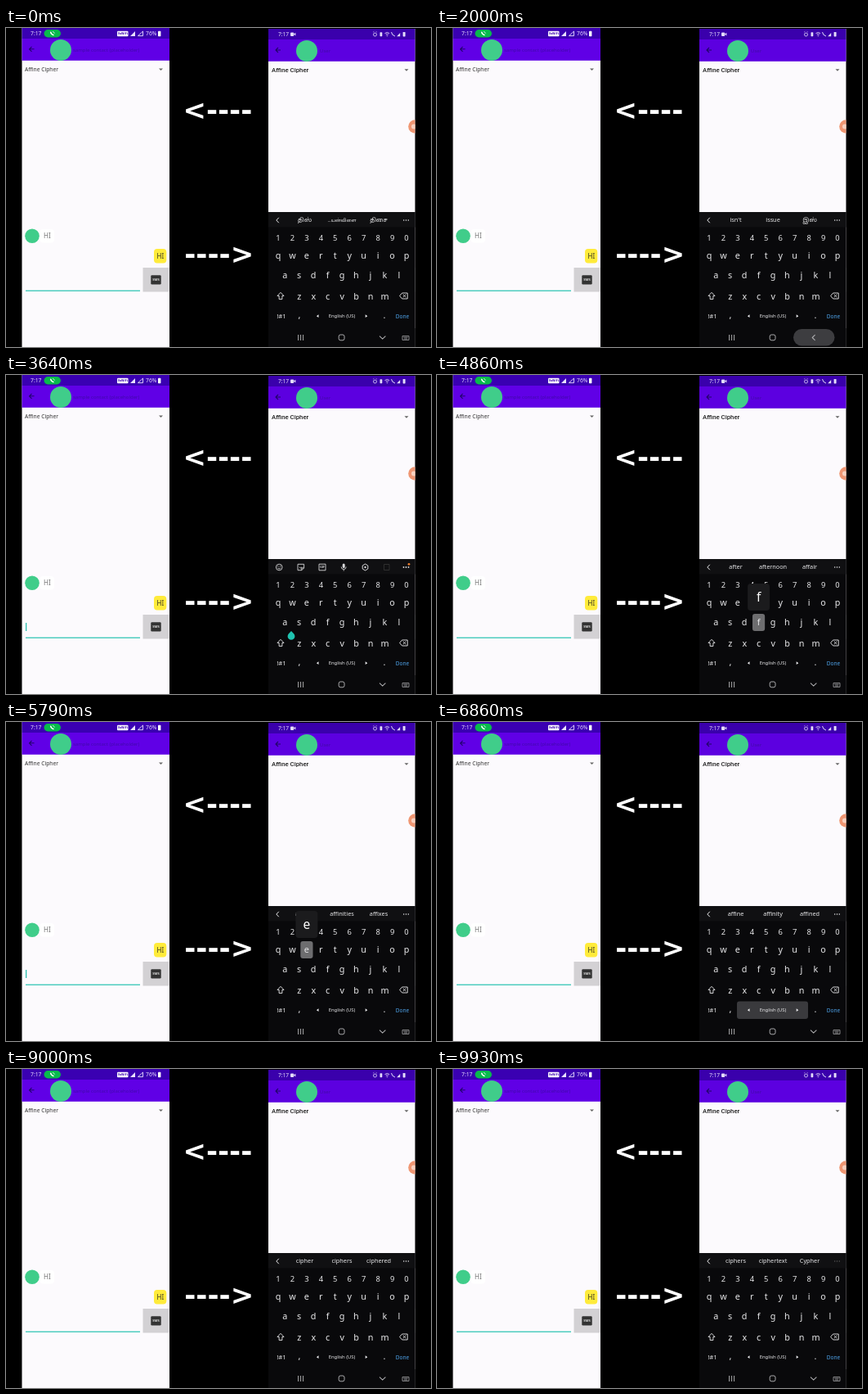
Animation, 520 px wide and 390 px high, one loop 10 s. Source, as an HTML page:

```html
<!DOCTYPE html>
<html lang="en">
<head>
<meta charset="utf-8">
<title>Two phone chat</title>
<style>
html, body { margin: 0; width: 100%; height: 100%; overflow: hidden; background: #000; }
svg { display: block; width: 520px; height: 390px; font-family: "Noto Sans", "Noto Sans Tamil", sans-serif; }
text { white-space: pre; }
</style>
</head>
<body>
<svg viewBox="0 0 520 390">
  <defs><clipPath id="screen"><rect x="321" y="1" width="179.5" height="389"/></clipPath></defs>
  <g id="base"></g>
  <g clip-path="url(#screen)">
    <g id="chat"></g>
    <g id="keys"></g>
    <g id="nav"></g>
  </g>
  <rect id="caret" x="24" y="303" width="1.3" height="10" fill="#2cbfae"/>
</svg>
<script>
const LOOP = 10000, STEP = 500 / 7;
const el = id => document.getElementById(id);

// Shape helpers; label() takes the vertical middle of its capitals
const box = (x, y, w, h, fill, r = 0) =>
  `<rect x="${x}" y="${y}" width="${w}" height="${h}" rx="${r}" fill="${fill}"/>`;
const disc = (x, y, r, fill) => `<circle cx="${x}" cy="${y}" r="${r}" fill="${fill}"/>`;
const fillPath = (d, fill) => `<path d="${d}" fill="${fill}"/>`;
const line = (d, color, w = 1) =>
  `<path d="${d}" fill="none" stroke="${color}" stroke-width="${w}" stroke-linejoin="round"/>`;
const label = (x, y, s, size, fill, anchor = 'start', weight = 400, font = '') =>
  `<text x="${x}" y="${y + size * .36}" font-size="${size}" fill="${fill}" text-anchor="${anchor}" ` +
  `font-weight="${weight}"${font ? ` font-family="${font}"` : ''}>${s}</text>`;
const mid = (x, y, s, size, fill, weight) => label(x, y, s, size, fill, 'middle', weight);

const GREEN = '#40cd8a', YELLOW = '#ffeb3b', PAPER = '#fcfafd', TEAL = '#36c7b6';
const SANS = 'Roboto, sans-serif';

const backArrow = (x, y) => line(`M${x + 7} ${y}H${x + 1}M${x + 4} ${y - 3}L${x + 1} ${y}l3 3`, '#21056a', 1.1);
const dropDown = (x, y) => fillPath(`M${x} ${y}h5l-2.5 2.6z`, '#666');
const sendButton = x =>
  box(x, 293, 32, 29.5, '#d3d1d4') + box(x + 9.8, 302.2, 12.4, 11.2, '#333', 1.2) +
  mid(x + 16, 307.8, 'SMS', 4.2, '#ddd', 600);

function leftPhone() {
  return box(19.5, 0, 180.5, 390, PAPER) +
    box(19.5, 0, 180.5, 13, '#3a00b2') + box(19.5, 13, 180.5, 26.8, '#6000e6') +
    label(30, 6.5, '7:17', 6.8, '#e8e0ff') +
    box(46.5, 2, 20.5, 9.5, '#08bb4c', 4.7) +
    line('M54.5 4.6q.6 3.4 4 4.2', '#fff', 1.4) + line('M57 4.4q2 .2 2.4 2.3', '#fff', .7) +
    box(136, 3.8, 13.5, 6.4, '#fff', 1) + mid(142.7, 7, 'VoWiFi', 3.6, '#3a00b2', 700) +
    fillPath('M152 10h6V4z', '#e8e0ff') + line('M161.5 9.6h6V4z', '#e8e0ff', .9) +
    label(171, 6.5, '76%', 6.8, '#e8e0ff') + box(186, 3.8, 3.4, 6.4, '#fff', .6) +
    backArrow(27.5, 25.8) + disc(67, 27, 13, GREEN) +
    label(82, 27, 'sample contact (placeholder)', 6, '#4208ad') +
    label(23, 51, 'Affine Cipher', 6.7, '#333') + dropDown(187, 49.4) +
    disc(32, 254.2, 8.8, GREEN) + box(41.5, 246, 17.5, 16.5, '#fff', 4) +
    label(46, 254.3, 'HI', 8, '#777') +
    box(181, 270, 15.3, 17.5, YELLOW, 4) + label(184.5, 279, 'HI', 8, '#3b3822') +
    sendButton(167.5) + box(24, 320.6, 140, 1.3, TEAL);
}

function arrows() {
  const font = 'DejaVu Sans, sans-serif';
  return label(216.4, 100, '&lt;----', 34, '#fff', 'start', 700, font) +
    label(218.2, 275.8, '----&gt;', 34, '#fff', 'start', 700, font);
}

function rightPhone() {
  const ink = '#e4dcfa';
  return box(321, 1, 180, 389, PAPER) +
    box(321, 1, 180, 13, '#3a00ac') + box(321, 14, 180, 26.8, '#5c00e0') +
    label(333, 7.6, '7:17', 6.6, ink) + box(348, 5.5, 4.2, 4.4, ink, 1) + fillPath('M352 7.6l2.3-1.8v3.8z', ink) +
    line('M449.5 8a2 2 0 1 0 4 0a2 2 0 1 0-4 0M449.3 5l1-.8M453.7 5l-1-.8', ink, .8) +
    box(457.5, 5.2, 2.8, 5, ink, .6) +
    line('M463.5 6.6q2.8-2.4 5.6 0M464.8 8q1.5-1.2 3 0', ink, .9) + disc(466.3, 9.6, .7, ink) +
    line('M471.5 5q.6 4 4.5 5', ink, 1) + fillPath('M478.2 10.2h4V6z', ink) +
    box(485.6, 5, 3, 5.4, ink, .6) +
    backArrow(329, 27) + disc(368, 28, 13, GREEN) + label(384, 28, 'User', 6, '#430aa8') +
    label(325, 51.6, 'Affine Cipher', 7.8, '#222', 'start', 500, SANS) + dropDown(487.5, 50.2) +
    disc(500.5, 120.5, 8.3, '#ef9672') + disc(499, 120.5, 3, '#f9d3c2') +
    box(481, 244, 16.3, 17.7, YELLOW, 4) + mid(489.2, 252.7, 'HI', 8.2, '#222', 600) +
    disc(333.5, 277.5, 8.8, GREEN) + box(343, 269.5, 17.5, 16.5, '#fff', 4) +
    label(348, 278.2, 'HI', 8, '#444') +
    label(326, 308, 'this is', 8.7, '#222', 'start', 500, SANS) +
    box(325, 321, 140, 1.2, '#45bdb0') + sendButton(468.3);
}

// Key layout: first x and y of each row, with a common pitch
const PITCH = 17.45;
const ROWS = [['1234567890', 333, 256.5], ['qwertyuiop', 333, 278.5], ['asdfghjkl', 341.2, 302.5], ['zxcvbnm', 358.8, 327.8]];
const keyAt = {};
for (const [row, x0, y] of ROWS) [...row].forEach((c, i) => keyAt[c] = [x0 + i * PITCH, y]);

// key, pressed from, released at
const PRESSES = [
  ['i', 140, 290], ['s', 640, 790], [' ', 4000, 4140],
  ['a', 4290, 4430], ['f', 4500, 4640], ['f', 4790, 4930], ['i', 5000, 5140], ['n', 5220, 5430], ['e', 5710, 5860],
  [' ', 6860, 7360],
  ['c', 8000, 8070], ['i', 8290, 8430], ['p', 8570, 8710], ['h', 8860, 9000], ['e', 9140, 9290], ['r', 9360, 9500]
];

const WORDS = [
  [0, 'திஸ்', '...யன்விளை', 'திசை'], [290, 'is', 'in', 'it'], [860, "isn't", 'issue', 'இஸ்'],
  [4140, 'the', 'a', 'not'], [4430, 'a', 'an', 'and'], [4640, 'after', 'afternoon', 'affair'],
  [4930, 'affairs', 'affect', 'afford'], [5140, 'affinity', 'affiliate', 'affix'],
  [5430, 'affinity', 'affinities', 'affixes'], [5930, 'affine', 'affinity', 'affined'],
  [7640, 'and', 'for', 'from'], [8070, 'can', 'call', 'come'], [8430, 'city', 'circle', 'cited'],
  [8710, 'cipher', 'ciphers', 'ciphered'], [9570, 'ciphers', 'ciphertext', 'Cypher']
];

const INK = '#e9e9eb';

function toolbar() {
  const c = '#d8d8da';
  return line('M330.4 235a3.8 3.8 0 1 0 7.6 0a3.8 3.8 0 1 0-7.6 0M332.4 236q1.8 2 3.6 0', c, .9) +
    disc(332.9, 233.8, .6, c) + disc(335.5, 233.8, .6, c) +
    line('M357 231.3h7.6v4.6l-2.8 2.8H357zM364.6 235.9h-2.8v2.8M359 235q1.5 2 3 0', c, .9) +
    line('M383 231.2h8v7.6h-8z', c, .9) + mid(387, 235, 'GIF', 3.4, c, 700) +
    box(411.7, 230.6, 3, 5.4, c, 1.5) + line('M410.2 234.5q0 3 3 3t3-3M413.2 237.5v2', c, .9) +
    line('M439.5 231l3.3 2v4l-3.3 2l-3.3-2v-4z', c, 1) + disc(439.5, 235, 1.2, c) +
    line('M462.5 231.5h6.5v7h-6.5z', '#333', .9) +
    [486.5, 489.5, 492.5].map(x => disc(x, 235, .9, c)).join('') + disc(493, 231.3, 1.4, '#f08030');
}

function suggestions(t) {
  const words = WORDS.filter(w => w[0] <= t).pop().slice(1);
  const dots = t >= 9790 ? '#555' : INK;
  return line('M333.8 231.8l-3 3.2l3 3.2', INK, 1) +
    words.map((w, i) => mid([365.5, 411, 456][i], 234.8, w, w.startsWith('...') ? 5.4 : 7.3, INK, 500)).join('') +
    [486.7, 489.5, 492.3].map(x => disc(x, 235, .75, dots)).join('');
}

function keyboard(t) {
  const press = PRESSES.find(p => t >= p[1] && t < p[2]);
  let s = box(321, 225, 180, 165, '#09090b') + box(321, 225, 180, 18.5, '#101012');
  s += t >= 2500 && t < 4140 ? toolbar() : suggestions(t);
  if (press) s += press[0] === ' ' ? box(367, 341.5, 87, 21.5, '#3a3a3d', 3)
    : box(keyAt[press[0]][0] - 7.6, keyAt[press[0]][1] - 10.5, 15.2, 21, '#6d6d6f', 3);
  for (const c in keyAt) s += mid(keyAt[c][0], keyAt[c][1], c, /\d/.test(c) ? 9.4 : 10.8, INK);
  s += line('M336 323.3l4 4.2h-2.1v4h-3.8v-4H332z', INK, .9) +
    line('M484.6 324h6.6v7h-6.6l-3-3.5zM485.8 325.8l3.4 3.4M489.2 325.8l-3.4 3.4', INK, .9) +
    mid(337, 352, '!#1', 7.8, INK) + mid(359, 351, ',', 11, INK) +
    fillPath('M382.5 350.3v3.8l-2.6-1.9z', INK) + mid(411, 352.2, 'English (US)', 5.9, INK) +
    fillPath('M439.7 350.3v3.8l2.6-1.9z', INK) + mid(463, 351, '.', 11, INK) +
    mid(485, 352.2, 'Done', 6.6, '#4fa3ea');
  if (press && press[0] !== ' ') {
    const [x, y] = keyAt[press[0]];
    s += box(x - 13.5, y - 47.5, 27, 33, '#1b1b1d', 4) + mid(x, y - 31, press[0], 15.5, '#fff', 500);
  }
  return s;
}

function navBar(t, up) {
  const back = t >= 1930 && t < 3210, c = up ? '#a9a9ab' : '#666';
  let s = box(321, 367, 180, 23, up ? '#09090b' : PAPER);
  if (t >= 1930 && t < 2140) s += box(436, 368, 50.5, 20.5, '#3d3d40', 10.2);
  s += line('M357.6 375v7M360.6 375v7M363.6 375v7', c, 1) +
    `<rect x="407.2" y="375" width="6.8" height="6.8" rx="2" fill="none" stroke="${c}"/>` +
    line(back ? 'M462.6 375.2l-3.4 3.3l3.4 3.3' : 'M457 376.6l3.7 3.6l3.7-3.6', c, 1.1);
  if (!back) s += line('M485 376.6h8v4.8h-8zM486.5 378.2h5M487 380h4', c, .8);
  return s;
}

const handle = () => fillPath('M349 313l3.1 3.3a4.4 4.4 0 1 1-6.2 0z', '#1fc3b0');

const ease = p => { p = Math.min(1, Math.max(0, p)); return p * p * (3 - 2 * p); };
const slide = t => 165 * (t < 2700 ? ease((t - 2070) / 360) : 1 - ease((t - 2930) / 360));

function draw(t) {
  const drop = slide(t), up = drop < 164;
  el('keys').innerHTML = (up ? `<g transform="translate(0 ${drop})">${keyboard(t)}</g>` : '') +
    (t >= 3000 && t < 4000 ? handle() : '');
  el('nav').innerHTML = navBar(t, up);
  const beat = t % 1000;
  el('caret').style.display = beat >= 360 && beat < 860 ? '' : 'none';
}

el('base').innerHTML = leftPhone() + arrows();
el('chat').innerHTML = rightPhone();

let shown = -1;
function tick() {
  const n = Math.floor((performance.now() % LOOP) / STEP + .15) % 140;
  if (n !== shown) draw(Math.round(n * STEP / 10) * 10);
  shown = n;
  requestAnimationFrame(tick);
}
tick();
</script>
</body>
</html>
```
